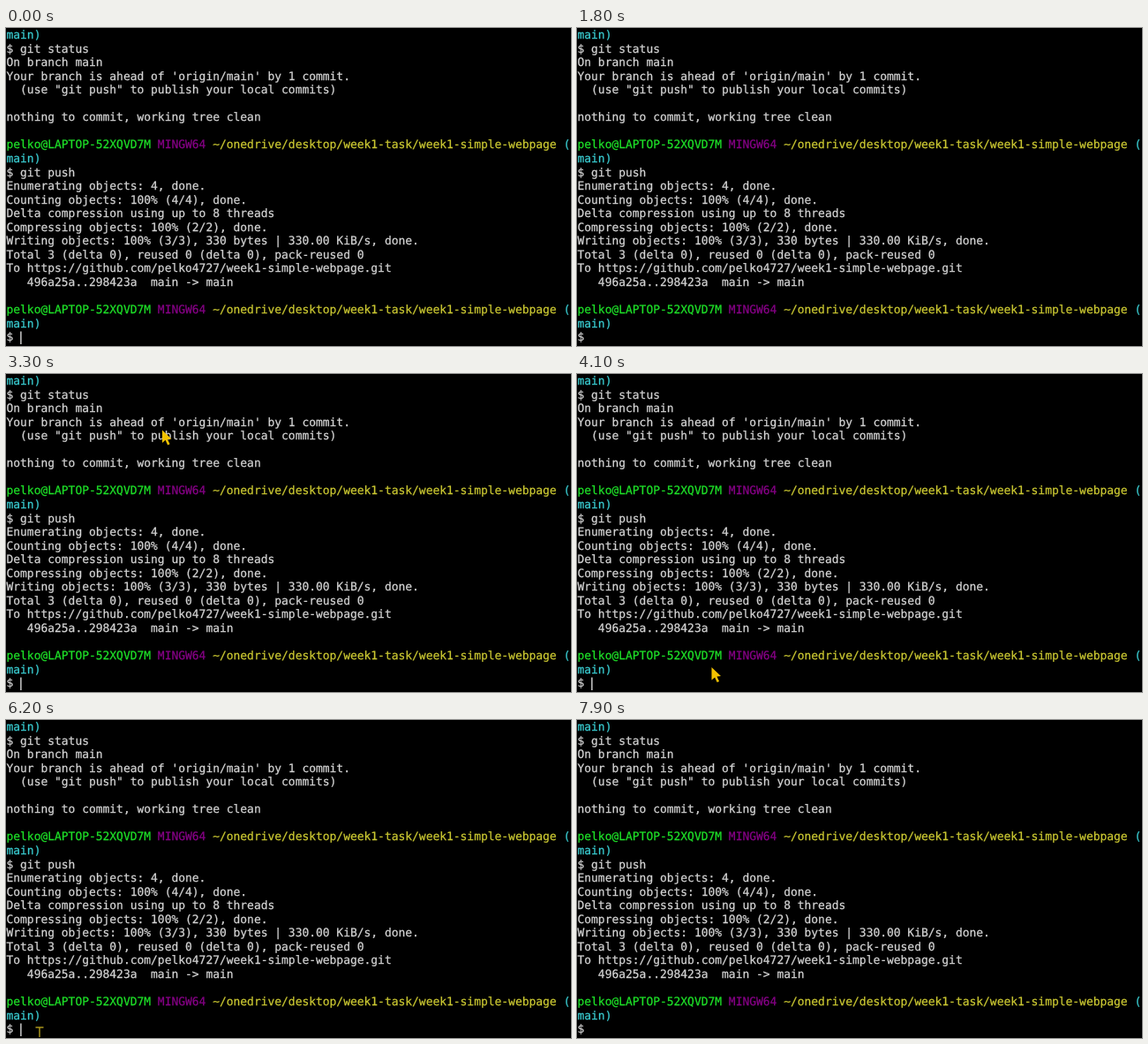
Animation, 640 px wide and 360 px high, one loop 8 s. Source, as an HTML page:

```html
<!DOCTYPE html>
<html lang="en">
<head>
<meta charset="utf-8">
<title>Terminal</title>
<style>
  html, body { margin: 0; width: 100%; height: 100%; overflow: hidden; background: #000; }
  svg { display: block; width: 640px; height: 360px; }
  text {
    font: 12.95px "DejaVu Sans Mono", monospace;
    text-rendering: geometricPrecision;
    white-space: pre;
    color: #d4d4d4;
  }
  tspan { fill: currentColor; stroke: currentColor; stroke-width: 0.25px; }
  .user { color: #1ee128; }
  .system { color: #860086; }
  .path { color: #cbc832; }
  .branch { color: #3acdd2; }
</style>
</head>
<body>
<svg viewBox="0 0 640 360">
  <g id="screen"></g>
  <rect id="caret" x="16.2" y="343.5" width="1.4" height="14.5" fill="#d8d8d8"/>
  <path id="arrow" d="M0 0V14.5L3.6 11.4L6.2 17L8.6 15.9L6 10.5L10.5 10Z" fill="#f2c200"/>
  <path id="beam" d="M-4.5 -5.5H4.5M0 -5.5V5.5" fill="none" stroke="#a8941c" stroke-width="1.5"/>
</svg>
<script>
const LOOP = 8000, LINE_HEIGHT = 15.55, FIRST_BASELINE = 12;
const BLINK = 530, CARET_OFF = 335;

const prompt = [
  [["user", "pelko@LAPTOP-52XQVD7M "], ["system", "MINGW64 "],
   ["path", "~/onedrive/desktop/week1-task/week1-simple-webpage "], ["branch", "("]],
  [["branch", "main)"]]
];

const lines = [
  prompt[1],
  "$ git status",
  "On branch main",
  "Your branch is ahead of 'origin/main' by 1 commit.",
  '  (use "git push" to publish your local commits)',
  "",
  "nothing to commit, working tree clean",
  "",
  ...prompt,
  "$ git push",
  "Enumerating objects: 4, done.",
  "Counting objects: 100% (4/4), done.",
  "Delta compression using up to 8 threads",
  "Compressing objects: 100% (2/2), done.",
  "Writing objects: 100% (3/3), 330 bytes | 330.00 KiB/s, done.",
  "Total 3 (delta 0), reused 0 (delta 0), pack-reused 0",
  "To https://github.com/pelko4727/week1-simple-webpage.git",
  "   496a25a..298423a  main -> main",
  "",
  ...prompt,
  "$"
];

// Pointer paths as [time, x, y]; hidden outside their time span.
const arrowPath = [[3000, 214, -18], [3300, 177, 63], [3600, 168, 180], [4100, 152.5, 332], [4400, 146, 362]];
const beamPath = [[5950, 44, 368], [6150, 38, 353.5], [6650, 38, 353.5], [6850, 34, 368]];

const byId = id => document.getElementById(id);
const screen = byId("screen"), caret = byId("caret"), arrow = byId("arrow"), beam = byId("beam");

function svgElement(tag, parent, content = "") {
  const element = document.createElementNS("http://www.w3.org/2000/svg", tag);
  element.textContent = content;
  return parent.appendChild(element);
}

lines.forEach((line, row) => {
  const text = svgElement("text", screen);
  text.setAttribute("x", 0.5);
  text.setAttribute("y", FIRST_BASELINE + row * LINE_HEIGHT);
  const spans = Array.isArray(line) ? line : [["", line]];
  for (const [style, content] of spans) {
    svgElement("tspan", text, content).setAttribute("class", style);
  }
});

function show(element, visible) {
  element.style.visibility = visible ? "visible" : "hidden";
}

function movePointer(element, path, time) {
  const next = path.findIndex(point => point[0] > time);
  show(element, next > 0);
  if (next < 1) return;
  const [t0, x0, y0] = path[next - 1], [t1, x1, y1] = path[next];
  const k = (time - t0) / (t1 - t0);
  element.setAttribute("transform", `translate(${x0 + (x1 - x0) * k} ${y0 + (y1 - y0) * k})`);
}

function draw() {
  const time = performance.now() % LOOP;
  show(caret, Math.floor((time - CARET_OFF) / BLINK) % 2 !== 0);
  movePointer(arrow, arrowPath, time);
  movePointer(beam, beamPath, time);
  requestAnimationFrame(draw);
}
draw();
</script>
</body>
</html>
```
